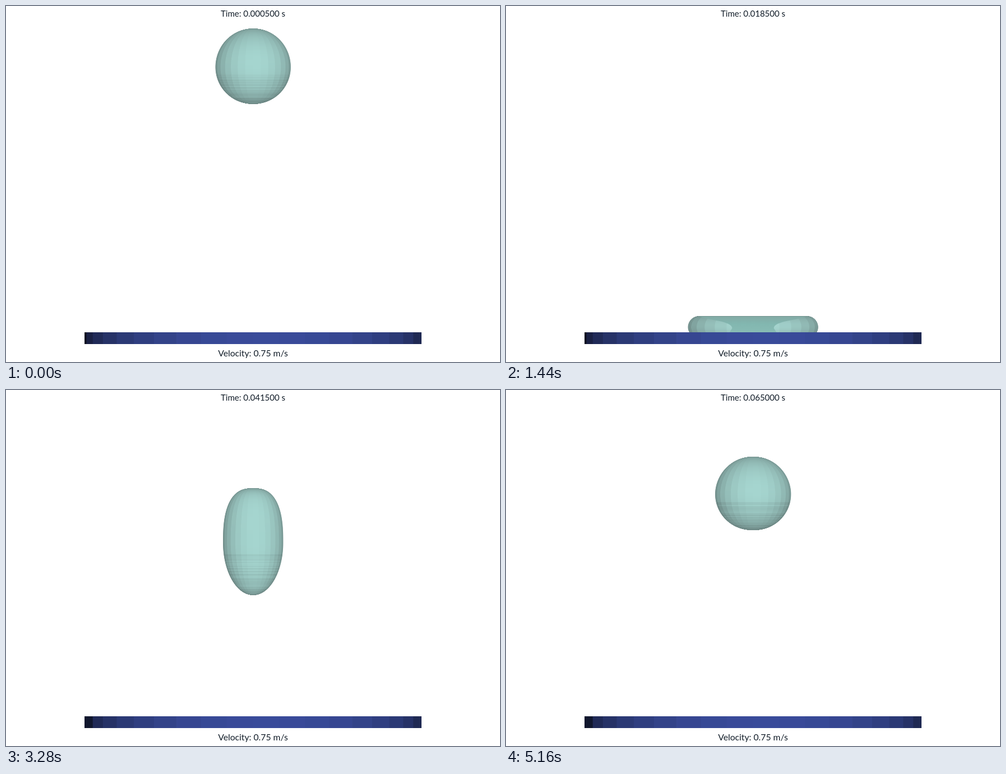
Write an HTML page with a canvas that moves like this. It is 881 by 635 pixels and loops after 5.2 s.

```html
<!DOCTYPE html>
<html lang="en">
<head>
<meta charset="utf-8">
<title>Bouncing droplet</title>
<style>
html, body { margin: 0; width: 100%; height: 100%; overflow: hidden; background: #fff; }
canvas { display: block; }
</style>
</head>
<body>
<canvas id="stage" width="881" height="635"></canvas>
<script>
const ctx = document.getElementById('stage').getContext('2d');
const CX = 440.5, PLATE = 582, RAD = Math.PI / 180;

// time (ms of simulation), top, bottom, radius, flat core, roundness above
const POSES = [
  [0.5, 40, 175, 67, 0, 2],
  [7.5, 267, 413.5, 63, 0, 2.3],
  [12.2, 440, 582, 66, 0, 2.1],
  [13.5, 486, 622, 80, 0.1, 2.2],
  [15, 530, 610, 101, 0.5, 2.1],
  [18.5, 553, 592, 116, 0.83, 2],
  [20.5, 537, 596, 103, 0.65, 2],
  [22.5, 499, 602, 82, 0.35, 2.2],
  [26.5, 365, 582, 55, 0.2, 2.7],
  [31.5, 295, 483, 56, 0.2, 3.2],
  [36.5, 250, 400, 62, 0.08, 2.4],
  [41.5, 175, 366, 53.5, 0, 2.6],
  [47, 158, 299, 63, 0.1, 2.4],
  [51.5, 157, 247.5, 78, 0.3, 2],
  [59, 112, 265, 62, 0.1, 2.1],
  [65, 119, 250, 67.5, 0.04, 1.95]
];

const clamp = (v, lo, hi) => Math.max(lo, Math.min(hi, v));
const bump = (t, at, width) => Math.exp(-(((t - at) / width) ** 2));
const noise = n => { const v = Math.sin(n) * 43758.5453; return v - Math.floor(v); };
const rgb = c => `rgb(${c.map(Math.round)})`;
const sinDeg = a => Math.sin(a * RAD), cosDeg = a => Math.cos(a * RAD);

// Smooth cubic interpolation through the poses
function poseAt(t) {
  const last = POSES.length - 1;
  let k = 0;
  while (k < last - 1 && t > POSES[k + 1][0]) k++;
  const a = POSES[k], b = POSES[k + 1], span = b[0] - a[0], u = (t - a[0]) / span;
  const slope = (j, c) => {
    const p = POSES[Math.max(0, j - 1)], q = POSES[Math.min(last, j + 1)];
    return (q[c] - p[c]) / (q[0] - p[0]) * span;
  };
  const [, top, bottom, radius, flat, above] = a.map((v, c) => {
    const d = b[c] - v, m = slope(k, c), n = slope(k + 1, c);
    return v + u * (m + u * (3 * d - 2 * m - n + u * (m + n - 2 * d)));
  });
  return {
    top, bottom, radius, above,
    core: Math.max(0, flat),
    mid: top + 0.51 * (bottom - top),
    below: 2 - 0.5 * bump(t, 31, 5) - 0.3 * bump(t, 51.5, 3) + 0.3 * bump(t, 7.5, 4),
    waist: 5 * bump(t, 31.5, 2.5),
    dish: clamp(1.2 * (1 - ((t - 18) / 3.5) ** 2), 0, 1)
  };
}

function radiusAt(y, p) {
  const upper = y < p.mid;
  const d = upper ? (p.mid - y) / (p.mid - p.top) : (y - p.mid) / (p.bottom - p.mid);
  if (d >= 1) return 0;
  const n = upper ? p.above : p.below;
  const r = p.radius * (p.core + (1 - p.core) * (1 - d ** n) ** (1 / n));
  return upper ? r - p.waist * Math.sin(Math.PI * d) ** 2 : r;
}

function drawDish(p) {
  const r = p.radius, h = PLATE - p.top;
  ctx.save();
  ctx.globalAlpha = p.dish;
  ctx.translate(CX, p.top);
  const fill = ctx.createLinearGradient(0, 0, 0, h);
  ['#83aaa5', '#82b7b0', '#88bbb4'].forEach((c, i) => fill.addColorStop(i / 2, c));
  ctx.fillStyle = fill;
  ctx.scale(r, h);
  ctx.beginPath();
  ctx.moveTo(-0.84, 0);
  ctx.bezierCurveTo(-0.7, 0.25, -0.32, 0.3, -0.32, 0.75);
  ctx.lineTo(-0.36, 1);
  ctx.lineTo(0.36, 1);
  ctx.lineTo(0.32, 0.75);
  ctx.bezierCurveTo(0.32, 0.3, 0.7, 0.25, 0.84, 0);
  ctx.scale(1 / r, 1 / h);
  ctx.fill();
  ctx.fillStyle = '#6f928d';
  ctx.fillRect(-0.84 * r, 0, 1.68 * r, 1);
  ctx.restore();
}

// One band between two angles around the vertical axis
function band(radius, from, to, y, height, color) {
  const x0 = CX + radius * sinDeg(from), x1 = CX + radius * sinDeg(to);
  ctx.fillStyle = rgb(color);
  ctx.fillRect(x0, y, x1 - x0 + (to < 90 ? 0.7 : 0), height);
}

function drawDrop(t, step) {
  const p = poseAt(t), end = Math.min(p.bottom, PLATE);
  for (let y = Math.round(p.top); y < end; y++) {
    const r = radiusAt(y + 0.5, p);
    if (r <= 0) continue;
    const slope = radiusAt(y + 1, p) - radiusAt(y, p);
    const out = 1 / Math.hypot(1, slope), up = slope * out;
    const low = y > p.mid + 0.2 * (p.bottom - p.mid);
    const dark = low && noise(Math.round(p.bottom - y) * 13 + step * 7.8) > 0.6;
    const stripe = dark ? 0.12 * (1 - p.dish) : 0;
    for (let a = -96; a < 90; a += 12) {
      const from = Math.max(a, -90), to = Math.min(a + 12, 90), mid = (from + to) / 2;
      const light = clamp(out * (cosDeg(mid) + 0.06 * sinDeg(mid)) + 0.12 * up - stripe, 0, 1);
      band(r, from, to, y, 1, [108 + 57 * light, 135 + 78 * light, 132 + 75 * light]);
    }
  }
  if (p.dish) drawDish(p);
}

function drawPlate(step) {
  for (let a = -90; a < 90; a += 9) {
    let light = 0.22 + 0.78 * Math.max(0, cosDeg(a)) ** 0.7;
    if (a < -72 && step % 6) light = 0.3;
    if (a >= 72) light = 0.54;
    band(300.5, a, a + 9, PLATE, 21, [57, 75, 154].map(c => c * light));
  }
}

function label(text, y, size) {
  ctx.font = `${size}px Lato, sans-serif`;
  ctx.fillText(text, CX, y);
}

function draw(now) {
  const step = Math.floor(now % 5200 / 40), t = (step + 1) * 0.5;
  ctx.fillStyle = '#fff';
  ctx.fillRect(0, 0, 881, 635);
  drawDrop(t, step);
  drawPlate(step);
  ctx.fillStyle = '#111c28';
  ctx.textAlign = 'center';
  label(`Time: ${(t / 1000).toFixed(6)} s`, 18.5, 15);
  label('Velocity: 0.75 m/s', 625, 15.7);
}

const start = performance.now();
function loop() {
  draw(performance.now() - start);
  requestAnimationFrame(loop);
}
loop();
</script>
</body>
</html>
```
